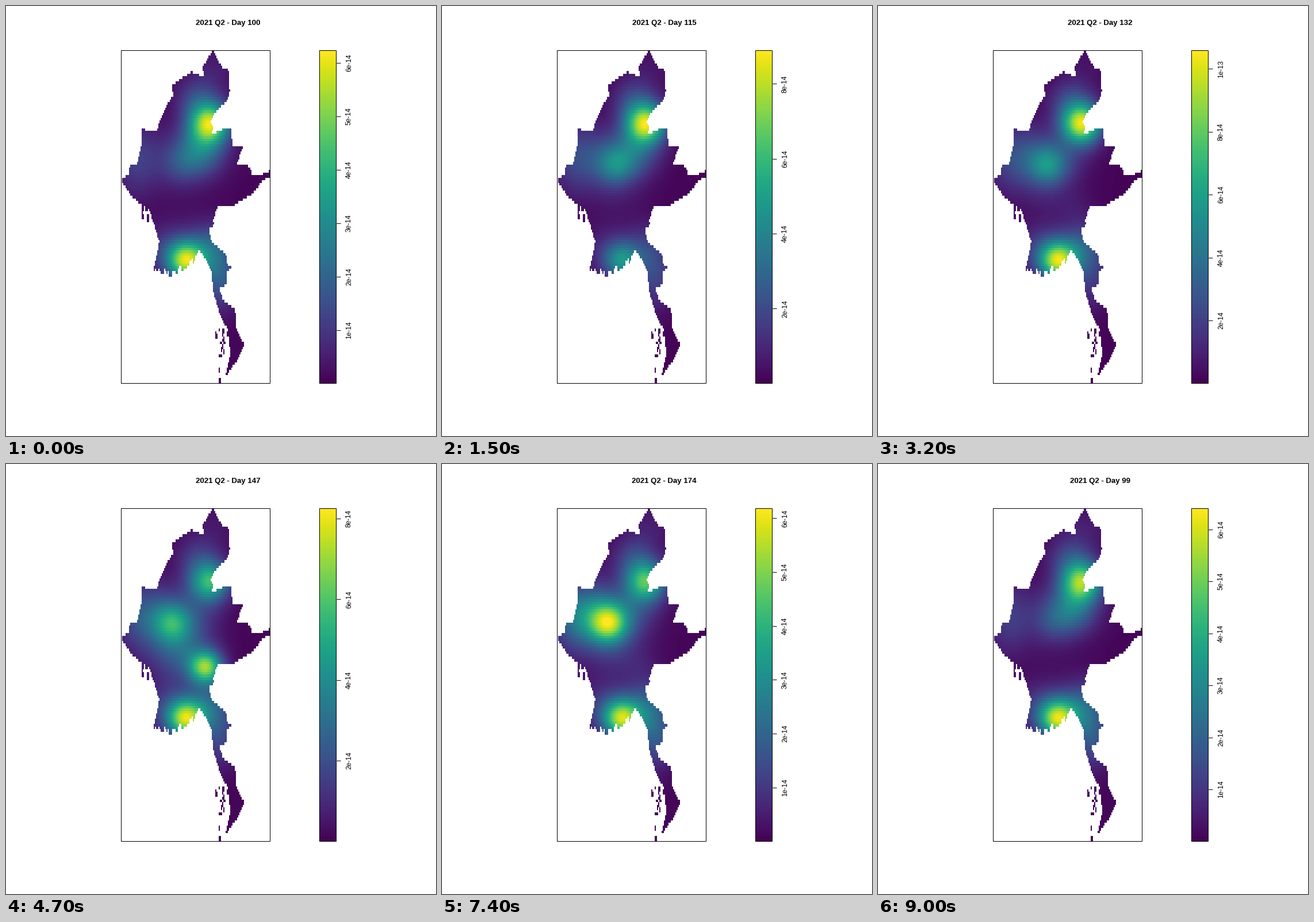
A matplotlib script for the animation above (9.1 s loop, 748 by 748 pixels).

```python
import random

import numpy as np
import matplotlib.pyplot as plt
from matplotlib.animation import FuncAnimation
from matplotlib.patches import Rectangle
from matplotlib.path import Path

SIZE, DPI, N = 748, 100, 128
X0, X1, Y0, Y1 = 200.5, 459.5, 77.5, 656.5
DX, DY = (X1 - X0) / N, (Y1 - Y0) / N
PX = 72 / DPI  # points per pixel

# Corners of the country, clockwise from the northern tip
OUTLINE = [
    (360, 77), (367, 91), (377, 107), (388, 112), (390, 149), (386, 165),
    (366, 183), (356, 203), (362, 214), (358, 222), (364, 221), (378, 215),
    (392, 214), (395, 246), (412, 247), (403, 277), (424, 279), (428, 295),
    (441, 295), (460, 287), (460, 296), (445, 306), (430, 326), (397, 348),
    (370, 348), (361, 371), (362, 382), (353, 386), (358, 411), (383, 432),
    (386, 452), (395, 453), (385, 464), (384, 485), (371, 492), (378, 512),
    (399, 527), (402, 562), (416, 590), (406, 612), (382, 647), (391, 604),
    (387, 566), (372, 535), (361, 498), (358, 462), (347, 441), (336, 423),
    (327, 448), (292, 471), (257, 461), (267, 410), (250, 357), (218, 331),
    (201, 303), (215, 293), (216, 276), (229, 275), (238, 235), (237, 215),
    (262, 217), (278, 177), (291, 157), (290, 138), (323, 115), (346, 124),
    (341, 108),
]

# Strength of each hot spot on the key days, in 1e-14
DAYS = [91, 100, 115, 132, 147, 158, 174]
SCALE = [7.76, 6.23, 8.89, 10.58, 8.25, 7.17, 6.18]
NORTH = [1.5, 5.2, 7.8, 9.6, 5.1, 2.8, 4.1]
LINK = [2.3, 2.3, 2.3, .9, .8, 1.7, .9]
CENTRE = [.6, .75, 2.8, 3.8, 3.2, 3.1, 4.0]
HILL = [0, 0, 0, .3, 6.0, 3.9, .2]
DELTA = [6.4, 5.2, 4.1, 8.95, 6.9, 6.0, 5.0]

gx, gy = np.meshgrid(X0 + (np.arange(N) + .5) * DX,
                     Y0 + (np.arange(N) + .5) * DY)


def scatter_islands(mask, rng, count, x, y, width, height):
    """Sprinkle islets one or two cells wide over a box."""
    for _ in range(count):
        i = int((x + rng.random() * width - X0) / DX)
        j = int((y + rng.random() * height - Y0) / DY)
        mask[j:j + rng.randint(1, 2), i:i + rng.randint(1, 2)] = True


def cut_inlets(mask, rng, x_from, x_to):
    """Notch the delta's lower edge with narrow river mouths."""
    above = gy[:, 0] < 480
    for i in range(int((x_from - X0) / DX), int((x_to - X0) / DX)):
        if rng.random() < .3:
            low = np.flatnonzero(mask[:, i] & above)[-1]
            mask[low - rng.randint(0, 1):low + 1, i] = False


def land_mask():
    rng = random.Random(4)
    cells = np.column_stack([gx.ravel(), gy.ravel()])
    mask = Path(OUTLINE).contains_points(cells).reshape(N, N)
    cut_inlets(mask, rng, 260, 326)
    scatter_islands(mask, rng, 10, 237, 344, 10, 32)
    scatter_islands(mask, rng, 12, 370, 562, 16, 42)
    scatter_islands(mask, rng, 3, 370, 606, 4, 24)
    scatter_islands(mask, rng, 2, 363, 566, 6, 8)
    scatter_islands(mask, rng, 1, 370, 648, 1, 1)
    return mask


sea = ~land_mask()


def density(day):
    """Sum of bell-shaped hot spots and their halos."""
    north, link, centre, hill, delta = (
        np.interp(day, DAYS, s) for s in (NORTH, LINK, CENTRE, HILL, DELTA))
    centre_x = np.interp(day, (115, 147), (304, 291))
    blobs = [  # x, y, spread x, spread y, strength
        (355, 205, 24, 24, north),
        (335, 165, 26, 26, .5 + .15 * north),
        (338, 252, 30, 30, link),
        (centre_x, 277, 24, 24, centre),
        (262, 262, 38, 38, .6 * centre),
        (348, 354, 20, 20, hill),
        (305, 325, 38, 38, .3 * hill + .15 * centre),
        (315, 444, 23, 23, delta),
        (285, 425, 30, 30, .2 * delta),
        (355, 415, 28, 28, .25 * delta),
        (372, 470, 22, 38, 1.7),
        (225, 270, 25, 45, .8),
        (360, 110, 30, 30, .4),
    ]
    return .1 + sum(a * np.exp(-((gx - x) / sx) ** 2 / 2
                               - ((gy - y) / sy) ** 2 / 2)
                    for x, y, sx, sy, a in blobs)


def tick_label(v):
    return f"{v}e-14" if v < 10 else f"{v / 10:g}e-13"


fig = plt.figure(figsize=(SIZE / DPI, SIZE / DPI), dpi=DPI, facecolor="white")
ax = fig.add_axes([0, 0, 1, 1])
ax.axis("off")

shown = dict(cmap="viridis", vmin=0, vmax=1, interpolation="nearest",
             aspect="auto")
heat = ax.imshow(np.zeros((N, N)), extent=(X0, X1, Y1, Y0), **shown)
ax.imshow(np.linspace(1, 0, 256)[:, None], extent=(545.5, 574.5, Y1, Y0),
          **shown)
for left, right in ((X0, X1), (545.5, 574.5)):
    ax.add_patch(Rectangle((left, Y0), right - left, Y1 - Y0, fill=False,
                           ec="black", lw=PX, snap=False))

title = ax.text(386.5, 33, "", ha="center", va="baseline", weight="bold",
                family="Liberation Sans", size=13.2 * PX)
ticks = [(ax.plot([575, 582], [0, 0], color="black", lw=PX,
                  solid_capstyle="butt")[0],
          ax.text(600, 0, "", rotation=90, rotation_mode="anchor",
                  ha="center", va="baseline", family="Liberation Sans",
                  size=12 * PX))
         for _ in range(8)]
ax.set_xlim(0, SIZE)
ax.set_ylim(SIZE, 0)


def draw(i):
    # Two-digit days sort after the three-digit ones
    day = 100 + i if i < 82 else 9 + i
    top = np.interp(day, DAYS, SCALE)
    heat.set_data(np.ma.array(density(day) / top, mask=sea))
    title.set_text(f"2021 Q2 - Day {day}")
    step = 1 if top < 7.78 else 2
    for k, (line, label) in enumerate(ticks, 1):
        v = k * step
        y = Y1 - (Y1 - Y0) * v / top
        line.set_visible(v <= top)
        label.set_visible(v <= top)
        line.set_ydata([y, y])
        label.set_y(y)
        label.set_text(tick_label(v))
    return [heat, title]


anim = FuncAnimation(fig, draw, frames=91, interval=100, repeat=True,
                     repeat_delay=0, blit=False)
plt.show()
```
